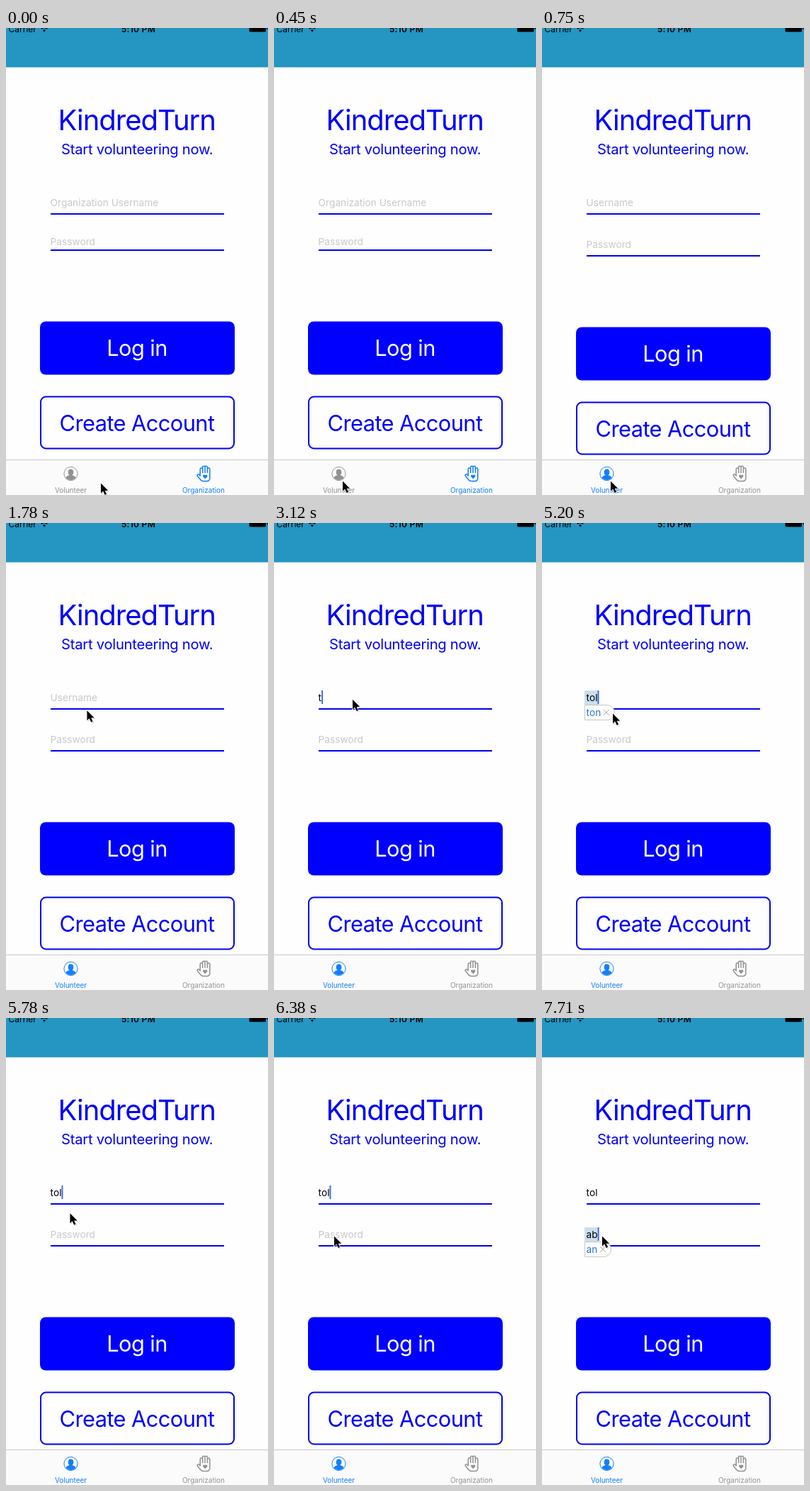
These frames come from a looping animation (370 px wide and 658 px high, 8 s). An HTML page:

```html
<!DOCTYPE html>
<html lang="en">
<head>
<meta charset="utf-8">
<title>Login screen</title>
<style>
  html, body { margin: 0; width: 100%; height: 100%; overflow: hidden; background: #fefefe; }
  svg { display: block; width: 370px; height: 658px; }
  text { font-family: Inter, "Liberation Sans", sans-serif; font-optical-sizing: none; white-space: pre; }
  .mid { text-anchor: middle; }
  .blue { fill: #0000f8; }
  .field { font-size: 13.7px; }
  .hint { fill: #c8c8cc; }
  .word { fill: #2b73d2; }
  .big { font-size: 30.8px; letter-spacing: -.57px; }
  .rule { fill: #0000ee; }
  .tab { color: #929292; }
  .tab.on { color: #137ffb; }
  .tab text { font-size: 10px; fill: currentColor; }
  .line { fill: none; stroke: currentColor; }
  .solid { fill: currentColor; }
</style>
</head>
<body>
<svg viewBox="0 0 370 658">
  <rect width="370" height="658" fill="#fefefe"/>
  <rect width="370" height="55.4" fill="#2496c1"/>

  <!-- status bar -->
  <text x="3.6" y="5.5" font-size="12">Carrier</text>
  <path d="M54 5.4l-2.1-2.2a3 3 0 0 1 4.2 0z"/>
  <path d="M49.8 1.3a6 6 0 0 1 8.4 0" fill="none" stroke="#000" stroke-width="1.5"/>
  <text class="mid" x="187" y="5.5" font-size="12" font-weight="600" letter-spacing=".3">5:10 PM</text>
  <rect x="343.5" y="-5" width="23.5" height="10.5" rx="1.5"/>
  <rect x="368" y="-2" width="1.5" height="4" rx=".7"/>

  <text class="mid blue" x="184.7" y="143.5" font-size="40" letter-spacing="-1">KindredTurn</text>
  <text class="mid blue" x="185.2" y="177.8" font-size="20.2" letter-spacing="-.25">Start volunteering now.</text>

  <!-- form -->
  <rect class="rule" x="63" y="261" width="245" height="2"/>
  <text id="userHint" class="field hint" x="62.6" y="251"></text>
  <text id="passHint" class="field hint" x="62.6" y="310">Password</text>
  <g id="lower">
    <rect class="rule" x="63" y="320" width="245" height="2"/>
    <rect x="48" y="421.5" width="275" height="75" rx="8" fill="#00f"/>
    <text class="mid big" x="185" y="470.3" fill="#fff">Log in</text>
    <rect x="49" y="527.5" width="273" height="73" rx="7.5" fill="#fefefe" stroke="#0000f4" stroke-width="2"/>
    <text class="mid big blue" x="185" y="575.5">Create Account</text>
  </g>

  <!-- typed text and corrections -->
  <g id="userPop"></g>
  <g id="passPop"></g>
  <text id="user" class="field" x="62.6" y="251"></text>
  <text id="pass" class="field" x="62.6" y="310"></text>
  <rect id="caret" width="2" height="19" fill="#3f70e2"/>

  <!-- tab bar -->
  <rect y="608" width="370" height="50" fill="#fbfbfb"/>
  <rect y="608" width="370" height="1" fill="#c9c9c9"/>
  <g id="volTab" class="tab">
    <circle class="line" cx="91.5" cy="628" r="9.6"/>
    <ellipse class="solid" cx="91.5" cy="626" rx="3.8" ry="4.4"/>
    <path class="solid" d="M84.3 633.4q1-2.2 5.2-3.4h4q4.2 1.2 5.2 3.4a9 9 0 0 1-14.4 0z"/>
    <text class="mid" x="91.5" y="654.5">Volunteer</text>
  </g>
  <g id="orgTab" class="tab">
    <path class="line" stroke-width="1.5" stroke-linejoin="round" d="M274.2 631V621.6a1.7 1.7 0 0 1 3.4 0V619a1.7 1.7 0 0 1 3.4 0a1.7 1.7 0 0 1 3.4 0V621.6a1.7 1.7 0 0 1 3.4 0V634q0 4.5-4.5 4.5h-4.5q-2.5 0-4-2l-4.3-5.2q-1-1.7.6-2.4q1.5-.4 2.5 1.2zM277.6 621v6M281 619v8M284.4 621v6"/>
    <path class="solid" d="M281.2 635.2l-2.9-2.9a1.7 1.7 0 0 1 2.9-2a1.7 1.7 0 0 1 2.9 2z"/>
    <text class="mid" x="279" y="654.5">Organization</text>
  </g>

  <g id="mouse">
    <path d="M1 1.5v14.5l3.3-3 2.6 5 3-1.2-2.3-5h4.2z" opacity=".18"/>
    <path d="M0 0v14l3.2-3 2.5 5.4 2.4-1.1-2.4-5.1h4.5z" stroke="#fff" stroke-width="1.6" paint-order="stroke" stroke-linejoin="round"/>
  </g>
</svg>
<script>
const LOOP = 8000;
const TICK = 148.2; // the screen refreshes once per tick; all times below are in ticks
const $ = id => document.getElementById(id);
const set = (id, attrs) => Object.entries(attrs).forEach(([k, v]) => $(id).setAttribute(k, v));

const ramp = (k, from, to) => Math.min(1, Math.max(0, (k - from) / (to - from)));
const easeOut = p => 1 - (1 - p) ** 2;
const easeInOut = p => p < .5 ? 2 * p * p : 1 - 2 * (1 - p) ** 2;

const home = { x: 134, y: 641.5 };
const moves = [
  { from: 0, to: 3, x: 97, y: 638.5, ease: easeOut },
  { from: 8, to: 13, x: 111, y: 248.7, ease: easeOut, bend: 26 },
  { from: 34, to: 35, x: 100, y: 268.5, ease: easeOut },
  { from: 35, to: 37, x: 92, y: 266, ease: easeOut },
  { from: 37, to: 43, x: 85, y: 307.5, ease: easeInOut }
];
const fields = [
  { id: "user", top: 236, focus: 17, word: "tol", keys: [21, 23, 27], fix: "ton", show: 27, hide: 37 },
  { id: "pass", top: 295, focus: 46, word: "ab", keys: [48, 49], fix: "an", show: 50, hide: 60 }
];

function mouseAt(k) {
  let { x, y } = home;
  for (const m of moves) {
    const e = m.ease(ramp(k, m.from, m.to));
    x += (m.x - x) * e + (m.bend || 0) * 4 * e * (1 - e);
    y += (m.y - y) * e;
  }
  return `translate(${x} ${y})`;
}

// Highlight over the typed word, with a correction bubble below.
function buildPopup({ id, fix, top }) {
  const pop = $(id + "Pop"), y = top + 20.5, mid = y + 10.5;
  pop.innerHTML = `<text class="field word" x="62.6" y="${top + 36}">${fix}</text>`;
  const x = 70.2 + pop.firstChild.getComputedTextLength();
  pop.insertAdjacentHTML("afterbegin", `
    <rect x="60" y="${top}" width="20" height="20" fill="#cbdeed"/>
    <path d="M60.5 ${y}H${x + 1}a10.5 10.5 0 0 1 0 21H60.5z" fill="#fefefe" stroke="#c6c6c6"/>
    <path d="M${x - 4} ${mid - 4}l8 8m0-8l-8 8" stroke="#aaa" fill="none"/>`);
}

function drawField(f, k) {
  const typed = f.keys.filter(t => t <= k);
  $(f.id).textContent = f.word.slice(0, typed.length);
  set(f.id + "Hint", { opacity: typed.length ? 0 : 1 });
  set(f.id + "Pop", { opacity: ramp(k, f.show, f.show + 2) - ramp(k, f.hide, f.hide + 2) });
  if (k < f.focus) return;

  // Each key restarts the blink: five ticks on, then a short gap.
  const last = typed.at(-1) ?? f.focus;
  const on = (k - last) % 7.4 < 5;
  set("caret", { x: 62.6 + $(f.id).getComputedTextLength(), y: f.top, opacity: on ? 1 : 0 });
}

function draw(t) {
  const k = Math.floor(t / TICK);
  const volunteer = k >= 5;
  set("mouse", { transform: mouseAt(k) });
  set("caret", { opacity: 0 });
  fields.forEach(f => drawField(f, k));

  $("userHint").textContent = volunteer ? "Username" : "Organization Username";
  set("passHint", { transform: `translate(0 ${volunteer ? 0 : -4})` });
  set("lower", { transform: `translate(0 ${volunteer ? 0 : -8})` });
  $("volTab").classList.toggle("on", volunteer);
  $("orgTab").classList.toggle("on", !volunteer);
}

fields.forEach(buildPopup);
const start = performance.now();
function tick() {
  draw((performance.now() - start) % LOOP);
  requestAnimationFrame(tick);
}
tick();
</script>
</body>
</html>
```
